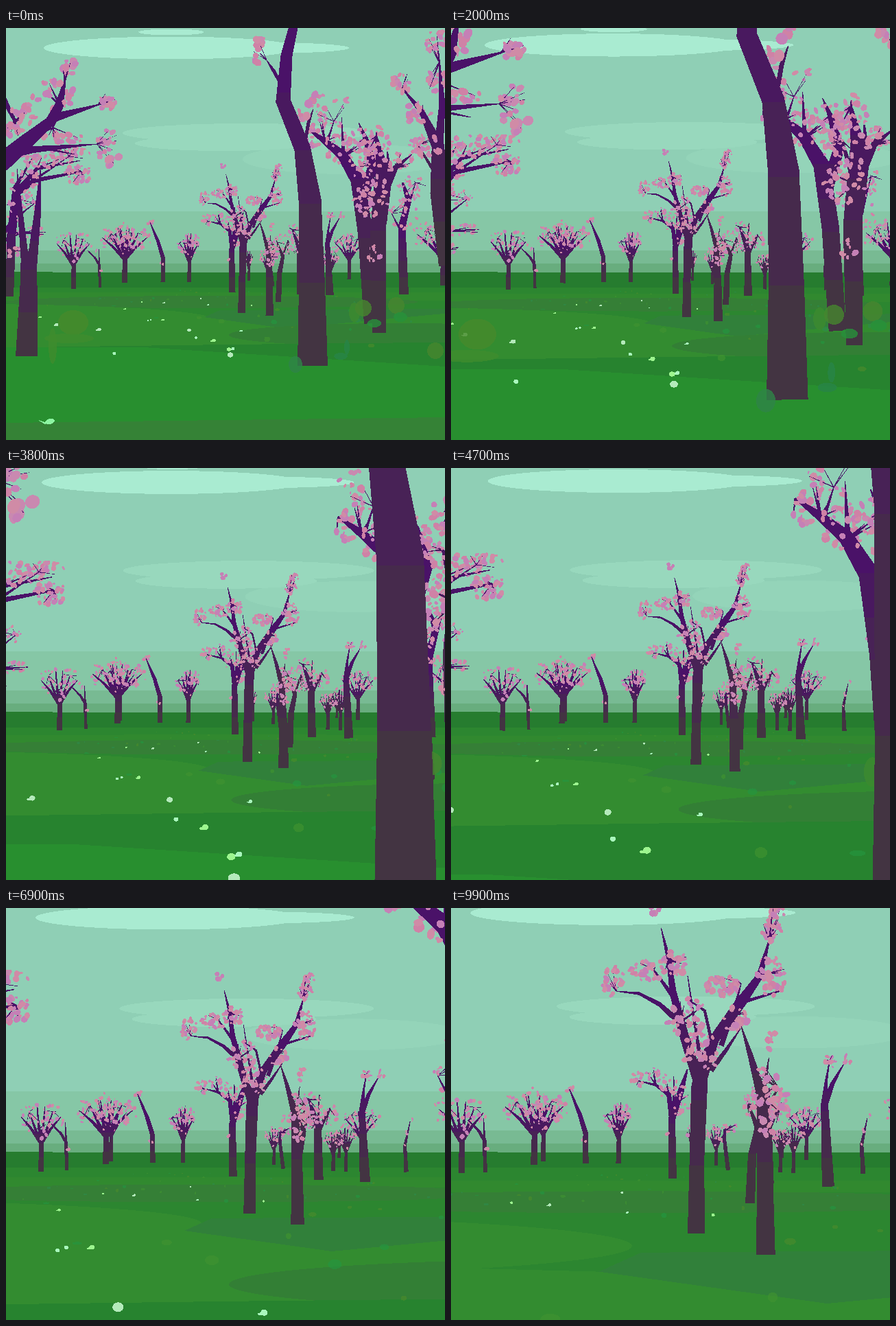
An HTML page that plays this animation: 640x600 px, repeating every 10000 ms.

```html
<!DOCTYPE html>
<html lang="en">
<head>
<meta charset="utf-8">
<title>Walk through blossom trees</title>
<style>
html, body { margin: 0; width: 100%; height: 100%; overflow: hidden; background: #8fcfb5; }
svg { display: block; width: 640px; height: 600px; }
</style>
</head>
<body>
<svg id="stage" viewBox="0 0 640 600" shape-rendering="crispEdges"></svg>
<script>
const LOOP = 10000, STEP = 100, EYE = 361;
const PETALS = ['#c989b0', '#cf82a6', '#c580b6', '#d08ba6'];

let seed = 7;
const rand = () => (seed = (seed * 16807) % 2147483647) / 2147483647;
const spread = a => (rand() * 2 - 1) * a;
const rows = text => text.split('/').map(row => row.trim().split(/\s+/).map(Number));
const n1 = v => v.toFixed(1);

// Side-to-side sway of the vanishing point: seconds, x
const SWAY = rows('0 325/1 321.5/3 324.5/4.7 331.6/6.9 325/8.8 326.5/9.9 316/10.4 313');
function vanish(t) {
  let i = 0;
  while (i < SWAY.length - 2 && t > SWAY[i + 1][0]) i++;
  const slope = k => {
    const a = SWAY[Math.max(0, k - 1)], b = SWAY[Math.min(SWAY.length - 1, k + 1)];
    return (b[1] - a[1]) / (b[0] - a[0]);
  };
  const [t0, a] = SWAY[i], [t1, b] = SWAY[i + 1];
  const d = t1 - t0, u = (t - t0) / d, v = 1 - u;
  return a * v * v * (1 + 2 * u) + b * u * u * (3 - 2 * u)
    + d * u * v * (v * slope(i) - u * slope(i + 1));
}

// Each item is drawn as seen at time `ref`; `r` is its approach speed per second of depth.
const items = [];
let defs = '';
const add = (layer, r, markup, ref = 0, eye = EYE) => items.push({ layer, r, markup, ref, eye });

const oval = (x, y, a, b, fill, extra = '') =>
  `<ellipse cx="${n1(x)}" cy="${n1(y)}" rx="${n1(a)}" ry="${n1(b)}" fill="${fill}" ${extra}/>`;
const poly = (points, fill) => `<polygon points="${points}" fill="${fill}"/>`;

function petalPath(x, y, a, b, turn) {
  const c = Math.cos(turn) * a, s = Math.sin(turn) * a, deg = turn * 57.3;
  const arc = `a${n1(a)} ${n1(b)} ${n1(deg)} 1 0 `;
  return `M${n1(x - c)} ${n1(y - s)}${arc}${n1(2 * c)} ${n1(2 * s)}${arc}${n1(-2 * c)} ${n1(-2 * s)}z`;
}

function limbPath(points) {
  const left = [], right = [];
  points.forEach(([x, y, w], i) => {
    const a = points[Math.max(0, i - 1)], b = points[Math.min(points.length - 1, i + 1)];
    const dx = b[0] - a[0], dy = b[1] - a[1], k = w / 2 / Math.hypot(dx, dy);
    left.push(`${n1(x - dy * k)} ${n1(y + dx * k)}`);
    right.unshift(`${n1(x + dy * k)} ${n1(y - dx * k)}`);
  });
  return 'M' + left.concat(right).join('L') + 'z';
}

function barkGradient(base, unit) {
  const id = 'bark' + items.length, top = base - unit * 4;
  const tones = ['#433442', '#462a4c', '#482256', '#49195f', '#4a1268'];
  const at = [0, .23, .45, .6, .76, 1];
  const stops = tones.map((c, i) =>
    `<stop offset="${at[i]}" stop-color="${c}"/><stop offset="${at[i + 1]}" stop-color="${c}"/>`).join('');
  defs += `<linearGradient id="${id}" gradientUnits="userSpaceOnUse" x1="0" x2="0" y1="${base}" y2="${top}">${stops}</linearGradient>`;
  return `url(#${id})`;
}

// limbs: "x y width / ..." strings; clusters: "x y rx ry count / ..."
function tree({ ref = 0, r, eye = EYE, size, limbs, clusters, unit }) {
  const bones = limbs.map(rows), joints = bones.flat(), base = bones[0][0][1];
  const back = ['', '', '', ''], front = ['', '', '', ''];
  let wood = bones.map(limbPath).join('');
  for (const [cx, cy, a, b, count] of rows(clusters)) {
    const point = () => {
      const turn = rand() * 6.28, d = Math.sqrt(rand());
      return [cx + Math.cos(turn) * a * d, cy + Math.sin(turn) * b * d];
    };
    const far = j => Math.hypot(j[0] - cx, j[1] - cy);
    const root = joints.reduce((p, q) => far(q) < far(p) ? q : p);
    if (count > 8 && far(root) < 12 * size) {
      for (let i = 0; i < 4; i++) {
        wood += limbPath([[root[0], root[1], Math.min(root[2], size * .8)], [...point(), .4]]);
      }
    }
    for (let i = 0; i < count; i++) {
      const s = size * (.4 + rand() * .75), tone = Math.floor(rand() * 4);
      (rand() < .45 ? back : front)[tone] +=
        petalPath(...point(), s, s * (.5 + rand() * .4), rand() * 3.1);
    }
  }
  const paint = list => list.map((d, i) => `<path d="${d}" fill="${PETALS[i]}"/>`).join('');
  const bark = barkGradient(base, unit || Math.max(16, base - eye));
  add(2, r, `${paint(back)}<path d="${wood}" fill="${bark}"/>${paint(front)}`, ref, eye);
}

function sapling(ref, x, y, r, h, w, reach, count) {
  const fork = y - h * .45, limbs = [`${x} ${y} ${w}/${x + w * .1} ${fork} ${w * .8}`];
  for (let i = 0; i < 6; i++) {
    const u = (i - 2.5) / 2.5, tipY = y - h * (.93 - .18 * Math.abs(u));
    limbs.push(`${x} ${fork + 6} ${w * .6}/${x + u * reach * .5} ${fork - h * .14} ${w * .45}/${x + u * reach} ${tipY} .8`);
  }
  const n = Math.round(count / 3);
  tree({ ref, r, size: 2.5, limbs, clusters:
    `${x - reach * .6} ${y - h * .73} ${reach * .6} ${h * .18} ${n}/${x + reach * .6} ${y - h * .73} ${reach * .6} ${h * .18} ${n}/${x} ${y - h * .72} ${reach * .5} ${h * .27} ${n}` });
}

// Clouds
const cloud = (x, y, a, b, fill, r) => add(0, r, oval(x, y, a, b, fill));
cloud(500, 191, 155, 22, '#94d4b9', .0055);
cloud(350, 153, 180, 14, '#98d8bd', .0045);
cloud(318, 168, 130, 11, '#98d8bd', .0046);
cloud(240, 29, 185, 16.5, '#a9ebd1', .0062);
cloud(375, 29, 125, 8, '#a9ebd1', .0063);
cloud(241, 6, 48, 4.5, '#a9ebd1', .0062);

// Ground patches
add(1, .033, oval(320, 391, 900, 6, '#31892f'));
add(1, .044, oval(300, 399, 300, 9, '#357f36'));
add(1, .0525, oval(-60, 424, 360, 22, '#338c30'));
add(1, .065, poly('-900,440 260,470 475,500 900,460 900,1000 -900,1000', '#338c30')
  + poly('260,470 475,500 900,460 900,448 300,452', '#31803a'), 6.9);
add(1, .0783, oval(575, 447, 250, 17, '#337f35'));
add(1, .0765, poly('-900,480 100,464 325,461 900,455 900,1000 -900,1000', '#27832f'));
add(1, .117, poly('-900,458 0,465 200,465 640,493 900,495 900,1000 -900,1000', '#288f2f'));
add(1, .23, poly('-900,583 0,575 640,567 900,565 900,1000 -900,1000', '#358236'));

// Leaves, tufts and bushes
const GREENS = ['#4a8b2b', '#24963f', '#2f8a4a', '#3f9330'];
for (let i = 0; i < 85; i++) {
  const depth = 22 + rand() * rand() * 110, x = 325 + spread(depth * 6), s = depth * .05;
  add(1.5, depth / 850, oval(x, EYE + depth - s, s * (.3 + rand()), s * (.3 + rand() * .6),
    GREENS[i % 4], 'opacity=".65"'));
}
const bush = (x, y, a, b, fill, r) => add(2, r, oval(x, y, a, b, fill, 'opacity=".8"'));
bush(521, 408, 12, 12, '#46862f', .085);
bush(569, 404, 12, 12, '#46862f', .083);
bush(575, 421, 10, 7, '#27923a', .085);
bush(508, 414, 8, 14, '#3d8a2f', .075);
bush(537, 430, 10, 6, '#27923a', .09);
bush(626, 470, 12, 12, '#46862f', .12);
bush(422, 490, 10, 12, '#2f8548', .145);
bush(488, 478, 10, 5, '#278548', .14);
bush(497, 465, 4, 11, '#278548', .13);
bush(98, 429, 22, 18, '#468a2b', .1);
bush(68, 463, 6, 26, '#3f8c2d', .12);
bush(92, 452, 36, 7, '#3f8c2d', .11);

// Small pale flowers
const flowers = '277 451/303 455/327 476/331 467/325 468/136 439/211 425/229 425/267 440/343 441/198 399/74 432/158 474/174 409/284 394/295 403/358 404/231 400/207 426/50 421';
rows(flowers).forEach(([x, y], i) => {
  const d = y - EYE, a = d * (.023 + (i % 3) * .007);
  const tone = ['#a9f7bd', '#9df58f', '#b4eabb'][i % 3];
  add(1.6, d / 850, oval(x, y, a, a * .85, tone)
    + (i % 2 ? oval(x - a, y + a * .4, a * .8, a * .35, tone) : ''));
});
add(1.6, .23, oval(64, 573, 7, 4, '#8df5a2', 'transform="rotate(-15 64 573)"') + poly('47,571 60,575 57,577', '#8df5a2'));

// Distant trees
sapling(0, 98, 380, .0248, 88, 7, 24, 45);
sapling(0, 173, 371, .0222, 88, 8, 33, 100);
sapling(0, 172, 368, .016, 84, 6, 20, 50);
sapling(0, 267, 370, .0195, 76, 6, 14, 50);
sapling(0, 354, 368, .018, 48, 4, 6, 9);
sapling(8.8, 525, 367, .0134, 82, 6, 24, 70);
sapling(2, 473, 364, .012, 40, 4, 10, 18);
sapling(8.8, 486, 384, .0216, 66, 6, 12, 30);
sapling(8.8, 505, 385, .02, 76, 6, 14, 28);
sapling(8.8, 395, 375, .02, 62, 5, 12, 24);
sapling(0, 637, 375, .015, 100, 9, 38, 110);
tree({ r: .0296, size: 2, limbs: ['137 378 4/136 345 4/130 335 3/119 324 1', '136 345 3/135 322 1'], clusters: '138 351 3 4 5/132 322 4 4 3' });
tree({ r: .02, size: 2.3, limbs: ['229 370 7/229 335 6/222 312 5/210 283 1'], clusters: '212 285 5 5 6/227 344 2 3 3' });
tree({ ref: 8.8, r: .0273, size: 2.5, limbs: ['411 381 6/406 340 5/406 325 4/421 318 1'], clusters: '412 322 12 7 16' });
tree({ ref: 8.8, r: .0254, size: 2.2, limbs: ['601 386 7/599 345 5/607 308 1'], clusters: '610 305 3 3 3/600 325 5 4 4/599 345 3 3 3' });
tree({ r: .026, size: 2.8, limbs: ['-5 385 12/-5 300 9/10 280 4/42 255 1', '-5 310 6/20 299 3/58 297 1', '-5 325 4/30 322 1'],
  clusters: '25 255 25 15 34/32 297 33 9 34/8 323 20 9 20' });

// Middle distance
tree({ ref: 8.8, r: .027, size: 3.3, limbs: ['333 393 12/332 310 10/345 270 9/354 240 2', '332 305 8/328 275 7/310 262 4/286 256 1', '335 290 4/335 250 1'],
  clusters: '285 253 12 11 16/314 246 18 10 16/330 268 20 13 26/345 285 16 22 24/328 330 3 3 3' });
tree({ ref: 3, r: .0292, eye: 354, size: 2.7, limbs: ['439 391 12/438 320 9/426 288 2', '438 330 7/453 300 2', '438 320 4/440 282 1'],
  clusters: '430 292 14 16 20/450 307 14 15 24/436 315 15 15 14' });
tree({ r: .032, size: 3.1, limbs: ['580 388 14/577 290 11/587 250 9/578 225 3', '587 258 4/597 225 1', '578 300 4/562 270 1'],
  clusters: '578 272 22 24 30/590 233 24 18 32/602 175 14 18 18' });
tree({ ref: 8.8, r: .0375, eye: 360, size: 3.5, limbs: ['546 403 17/541 290 10/543 260 4/548 230 1', '541 292 9/552 262 6/568 234 1'],
  clusters: '548 232 9 9 15/572 230 6 8 7' });
tree({ ref: 9.9, r: .0404, eye: 352, size: 3, limbs: ['436 430 14/439 360 12/447 320 9/433 285 2', '446 322 6/460 280 2'],
  clusters: '445 285 24 20 28/460 302 13 16 14' });
tree({ r: .0445, size: 3.6, limbs: ['5 391 12/8 300 13/15 240 13/42 222 7/110 209 2', '14 240 9/45 205 5/108 193 1', '12 235 7/38 190 1', '40 222 4/92 187 1'],
  clusters: '106 213 20 15 38/62 190 42 15 64/98 182 24 10 24/30 225 24 22 34/12 265 14 18 14/8 325 8 8 6' });
tree({ ref: 8.8, r: .0551, eye: 366, size: 4.6, limbs: [
  '363 461 22/364 365 19/367 275 21/371 238 16', '366 266 14/347 205 12/333 150 9/328 110 6/318 69 1',
  '342 190 8/316 167 6/290 153 4/260 150 1', '332 155 6/308 122 2', '370 262 15/386 212 13/420 165 14/445 130 9/457 84 2',
  '420 165 5/470 150 2', '395 220 7/410 180 5/421 140 1', '382 252 7/402 225 5/420 198 1', '368 235 5/352 130 1', '383 215 4/374 175 4/352 160 1'],
  clusters: '313 46 10 7 6/467 48 10 8 12/460 72 13 14 25/460 130 18 26 46/400 143 25 13 45/332 113 20 17 34/300 124 25 12 26/258 138 16 18 24/348 178 30 26 40/370 225 24 32 62/413 187 18 16 28' });
tree({ ref: 8.8, r: .0591, eye: 358, size: 4.6, limbs: ['450 485 24/449 385 20/445 285 13/431 235 7/419 197 1', '445 295 8/454 237 1', '448 305 5/466 275 2'],
  clusters: '456 215 11 12 7/449 260 16 11 13/460 290 18 17 34/436 296 15 14 14/450 325 9 18 14' });

// Near trees
tree({ r: .069, size: 4, limbs: ['533 430 22/524 300 22/513 222 21/490 185 15/465 165 9/440 147 2', '520 250 16/535 200 14/524 160 7/514 138 1', '492 187 6/489 130 1', '468 167 4/478 136 1'],
  clusters: '447 158 12 16 16/472 112 32 16 18/470 150 26 20 30/502 178 36 24 48/520 165 20 18 24' });
tree({ r: .088, size: 4, limbs: ['544 444 20/542 300 23/548 200 17/540 158 3', '548 245 14/568 203 8/592 184 1', '550 285 10/559 215 8/556 180 2', '544 250 8/530 200 2'],
  clusters: '540 165 20 22 36/535 205 30 24 50/535 250 28 28 60/537 330 9 13 18/578 193 14 12 16' });
tree({ r: .102, size: 5, limbs: ['640 346 18/630 240 23/630 172 19/606 122 8/578 88 2', '630 185 14/636 110 9/632 50 2', '628 215 6/600 170 2'],
  clusters: '578 78 15 15 20/602 125 19 18 22/628 20 17 18 22/630 80 16 20 18/612 172 24 16 28', unit: 70 });
tree({ r: .117, size: 5.6, unit: 70, limbs: ['30 478 32/33 375 25/33 325 22', '28 342 12/20 260 7/16 205 1', '38 342 15/46 270 10/51 200 1',
  '-8 197 28/30 165 22/72 130 13/134 112 2', '62 142 16/78 112 13/86 76 3', '-8 184 18/40 177 10/132 169 1', '-5 100 9/13 136 4', '30 165 5/68 145 2', '60 176 4/100 184 1'],
  clusters: '92 57 11 11 13/148 107 13 12 14/148 160 16 11 13/150 188 15 13 11/66 98 34 20 22/25 125 18 16 16/85 160 32 8 18/12 150 12 10 10' });
tree({ r: .137, size: 6, limbs: ['447 492 44/446 375 38/443 250 33/432 175 24/404 106 22/409 40 17/420 -6 13/424 -80 12', '400 80 5/390 62 5/380 47 1', '437 160 5/441 138 5/448 118 1'],
  clusters: '369 28 12 14 9/366 50 3 5 2/434 124 8 10 8/444 98 10 14 6' });

items.sort((a, b) => a.layer - b.layer || (a.layer > 1 ? a.r - b.r : 0));
const band = (y, fill) => `<rect y="${y}" width="640" height="${600 - y}" fill="${fill}"/>`;
const group = list => list.map(i => `<g class="item">${i.markup}</g>`).join('');
const stage = document.getElementById('stage');
stage.innerHTML = `<defs>${defs}</defs>${band(0, '#8fcfb5')}${band(267, '#86c7a6')}`
  + group(items.filter(i => i.layer < 1))
  + band(324, '#78ba93') + band(343, '#68ad7e') + band(356, '#267c2f') + band(378, '#2c8630')
  + poly('0,355 60,355 90,357 0,358', '#267c2f')
  + group(items.filter(i => i.layer >= 1));
const nodes = [...stage.querySelectorAll('.item')];

function draw(t) {
  const x = vanish(t);
  items.forEach((item, i) => {
    const depth = 1 - item.r * t, node = nodes[i];
    if (depth < .1) return node.setAttribute('display', 'none');
    const g = (1 - item.r * item.ref) / depth;
    node.removeAttribute('display');
    node.setAttribute('transform',
      `translate(${(x - vanish(item.ref) * g).toFixed(2)} ${(item.eye * (1 - g)).toFixed(2)}) scale(${g.toFixed(4)})`);
  });
}

const start = performance.now();
let shown = -1;
function tick() {
  const step = Math.floor((performance.now() - start) % LOOP / STEP);
  if (step !== shown) draw((shown = step) * STEP / 1000);
  requestAnimationFrame(tick);
}
tick();
</script>
</body>
</html>
```
